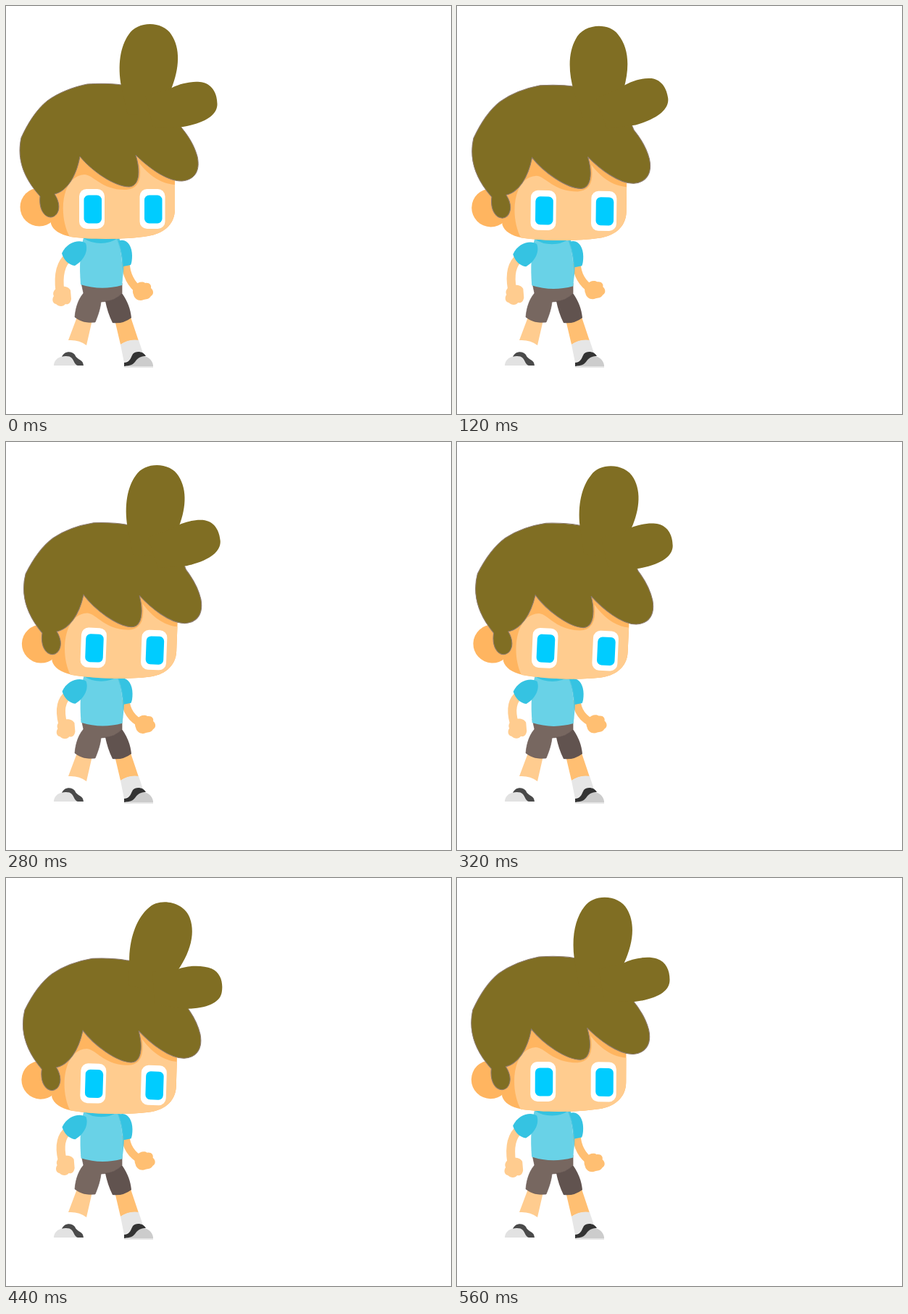
These frames come from a looping animation (614x564 px, 600 ms). An HTML page:

```html
<!DOCTYPE html>
<html lang="en">
<head>
<meta charset="utf-8">
<title>Idle boy</title>
<style>
html, body { margin: 0; width: 100%; height: 100%; overflow: hidden; background: #fff; }
svg { display: block; width: 614px; height: 564px; }
</style>
</head>
<body>
<svg viewBox="0 0 614 564">
  <!-- legs and shoes -->
  <path fill="#ffcc8f" d="M98 430L119 434L111 469Q101 461 86 462Z"/>
  <path fill="#ffbf72" d="M150 434L172 430L183 463Q170 460 158 468Z"/>
  <path fill="#e6e6e6" d="M158 468Q170 460 183 462L189 480L163 493Z"/>
  <path fill="#e2e2e2" d="M66 497C66 490 72 485 77 485C88 481 92 488 94 493L99 497Z"/>
  <path fill="#4a4a4a" d="M77 485C81 476 91 477 95 482C97 488 103 488 106 493L107 497H99C95 496 94 491 91 487C87 483 81 484 77 485Z"/>
  <path fill="#e6e6e6" d="M163 496H203V500H163Z"/>
  <path fill="#ccc" d="M166 498C176 496 178 491 181 488C185 484 190 484 194 485C200 488 203 493 203 498Z"/>
  <path fill="#333" d="M163 498V493C172 492 172 486 175 481C179 476 190 477 193 484C184 484 181 488 178 492C175 496 171 497 163 498Z"/>

  <!-- arms -->
  <path id="armL" fill="none" stroke="#ffcc8f" stroke-width="12"/>
  <path id="armR" fill="none" stroke="#ffbf72" stroke-width="11"/>
  <path id="handL" fill="#ffcc8f" d="M69 391C76 386 86 387 89 393L90 405C89 411 86 413 82 412C79 416 73 416 69 412C64 411 63 405 66 401C64 397 66 393 69 391Z"/>
  <path id="handR" fill="#ffbf72" d="M177 387C181 382 188 380 192 383C198 382 201 386 200 390C204 393 204 399 200 401C197 406 193 405 190 406C184 409 177 405 176 399C174 395 175 390 177 387Z"/>

  <!-- shorts -->
  <path fill="#776760" stroke="#6a5a55" stroke-width=".7" d="M104 383H160L160 397Q150 409 131 409C130 419 126 430 123 437Q106 439 95 430C96 417 100 405 107 397Z"/>
  <path fill="#61534f" d="M137 408Q151 407 160 397C168 408 172 420 173 431Q161 440 147 438C142 428 139 418 137 408Z"/>

  <!-- shirt -->
  <g id="shirt">
    <path fill="#69d2e7" d="M107 320H154C160 342 162 368 160 386Q131 394 103 385C101 360 102 340 107 320Z"/>
    <path fill="#4ec7e0" d="M152 320H156C161 335 163 350 162 366L160 386C162 362 160 338 152 320Z"/>
    <path fill="#35c3e0" d="M107 321H154Q144 328 131 328Q117 328 107 321Z"/>
    <path fill="#35c3e2" d="M155 325C166 320 174 331 174 345Q174 354 172 358L162 360C161 345 159 335 155 325Z"/>
    <path fill="#35c3e2" d="M77 342C84 326 102 322 110 328C114 339 107 352 95 359C87 358 80 352 77 342Z"/>
  </g>

  <!-- head -->
  <g id="head">
    <circle cx="46" cy="278" r="26.5" fill="#ffb560"/>
    <path fill="#ffb560" d="M60 225L110 190H233V281C233 303 216 315 196 318C165 323 118 323 90 319C74 316 65 310 62 301Z"/>
    <path fill="#ffcc8f" d="M88 319C73 293 74 236 108 233C121 233 132 255 166 254Q190 252 184 217C197 234 214 246 233 247V281C233 303 216 315 196 318C165 323 118 323 88 319Z"/>
    <g id="eye">
      <rect x="101" y="253" width="35" height="55" rx="10" fill="#fff"/>
      <rect x="107.5" y="261.5" width="24.5" height="39" rx="6.5" fill="#0cf"/>
    </g>
    <use href="#eye" x="83.5"/>
    <path fill="#806e23" stroke="#8d7c70" d="M159 109C146 107 126 107 112 108C92 112 72 120 57 131C42 143 30 162 21 182C16 205 19 232 47 263C45 281 53 292 62 292C72 291 78 277 67 260C84 256 97 236 102 208C118 228 150 250 170 250C184 249 186 229 179 206C195 222 222 243 243 242C262 240 268 226 264 208C260 193 252 180 242 168C228 132 200 110 159 109Z"/>
  </g>

  <!-- hair tuft -->
  <g fill="#806e23">
    <path id="tuftTop" d="M159 112C153 82 157 56 168 40C180 20 215 20 227 39C240 58 239 85 228 114L225 150H168Z"/>
    <path id="tuftSide" d="M226 115C240 107 260 104 272 107C286 111 291 124 291 137C291 151 276 163 242 168H202L192 124Z"/>
  </g>
</svg>
<script>
const LOOP = 600, STEP = 40, PEAK = 360;
const el = id => document.getElementById(id);

function place(id, x, y, angle = 0, px = 0, py = 0) {
  el(id).setAttribute("transform", `translate(${x} ${y}) rotate(${angle} ${px} ${py})`);
}

// 0 at low, steady rise to 1 at high, then a fall that slows down
function swing(t, low, high) {
  const p = (t - low + LOOP) % LOOP, rise = high - low;
  return p < rise ? p / rise : 1 - Math.sin(Math.PI / 2 * (p - rise) / (LOOP - rise));
}

function draw(ms) {
  const t = Math.floor((ms % LOOP) / STEP) * STEP;
  const sink = t < PEAK ? t / PEAK : (LOOP - t) / (LOOP - PEAK);
  const lean = sink ** 1.4;

  place("head", 3.2 * lean, 7 * sink, 3.1 * lean, 160, 280);
  place("shirt", 0.7 * sink, 3.5 * sink);

  // the tuft follows the head late
  const top = swing(t, 170, 450), side = swing(t, 220, 460);
  place("tuftTop", 10.5 * sink, 9 * sink, 20.5 * top - 6, 195, 125);
  place("tuftSide", 7 * sink + 8 * side - 3, 9 * sink, 20 * side - 9.4, 195, 130);

  const lx = 7 * sink, ly = -6 * sink, rx = 4 * sink, ry = -5 * sink;
  place("handL", lx, ly);
  place("handR", rx, ry);
  el("armL").setAttribute("d", `M87 ${346 + 3 * sink}Q${70 + sink} 360 ${74.5 + lx * 0.7} ${394 + ly}`);
  el("armR").setAttribute("d", `M165 ${354 + 3 * sink}Q166 ${380 - sink} ${185 + rx} ${394 + ry}`);
}

function tick() {
  draw(performance.now());
  requestAnimationFrame(tick);
}
tick();
</script>
</body>
</html>
```
